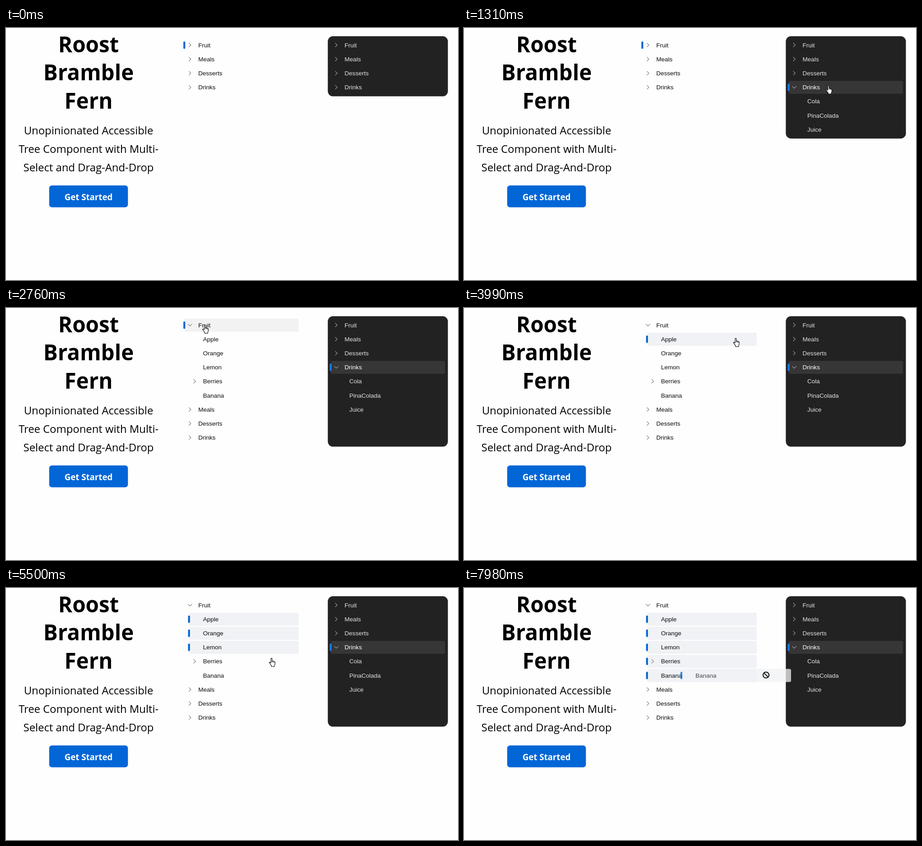
Animation of 1002x559 px, one loop 8000 ms. Source, as an HTML page:

```html
<!DOCTYPE html>
<html lang="en">
<head>
<meta charset="utf-8">
<title>Tree component</title>
<style>
  html, body { margin: 0; width: 100%; height: 100%; overflow: hidden; background: #fefefe; }
  svg { display: block; width: 1002px; height: 559px; }
  .intro { font-family: "Open Sans", "Noto Sans", sans-serif; text-anchor: middle; }
  .title { font-size: 47.5px; font-weight: 700; }
  .sub { font-size: 23.85px; }
  .cta { font-size: 18.7px; font-weight: 700; fill: #fff; }
  .tree { font: 13.52px "Liberation Sans", Arial, sans-serif; }
  .light { --text: #0c0d0f; --on: #0c0d0f; --arrow: #333; --bar: #0366d6; --row: #f0f2f5; --hover: #f2f2f3; }
  .dark { --text: #e3e3e3; --on: #fff; --arrow: #e3e3e3; --bar: #1f78e8; --row: #363636; --hover: #343434; }
  .tree text { fill: var(--text); }
  .tree text.on { fill: var(--on); }
  .bar { fill: var(--bar); }
  .row { fill: var(--row); }
  .hover { fill: var(--hover); }
  .arrow { fill: none; stroke: var(--arrow); stroke-width: 1; }
</style>
</head>
<body>
<svg id="stage" viewBox="0 0 1002 559">
  <g class="intro">
    <g class="title">
      <text x="183" y="54">Roost</text>
      <text x="183" y="116.3">Bramble</text>
      <text x="183" y="178.6">Fern</text>
    </g>
    <g class="sub">
      <text x="183" y="235.5">Unopinionated Accessible</text>
      <text x="183" y="276.7">Tree Component with Multi-</text>
      <text x="183" y="317.9">Select and Drag-And-Drop</text>
    </g>
    <rect x="95.7" y="349.3" width="174.6" height="48.4" rx="6.2" fill="#0366d6"/>
    <text class="cta" x="183" y="381.6">Get Started</text>
  </g>
  <rect id="panel" x="713.4" y="18.3" width="266.2" rx="11.5" fill="#222"/>
  <g id="light" class="tree light"></g>
  <g id="dark" class="tree dark"></g>
  <g id="ghost" class="tree light" opacity=".75"></g>
  <g id="hand" fill="#fff" stroke="#000" stroke-width="1.1" stroke-linejoin="round">
    <path d="M4.5 1.9Q4.5.6 5.8.6T7.1 1.9V7Q8.8 6.2 9.6 7.6Q11.2 7 11.9 8.5Q13.5 8.3 13.5 10.2V13Q13.5 15 12.2 16.6V19.3H5.5V17.2Q4 15.2 2.5 13Q.4 10.8.7 10Q1.8 8.6 4.5 11.2Z"/>
    <path d="M7.1 7V10M9.6 7.6V10.2M11.9 8.5V10.6" fill="none" stroke-width=".9"/>
  </g>
  <g id="barred" fill="#fff" stroke="#000" stroke-width="2">
    <circle r="6.6"/>
    <path d="M-4.6-4.6L4.6 4.6"/>
  </g>
</svg>
<script>
const LOOP = 8000, ROW = 31.2, INDENT = 10.4, DARK_X = 324.3;
const $ = id => document.getElementById(id);
const timed = [];

function add(parent, tag, attrs, from = 0, to = LOOP) {
  const el = document.createElementNS("http://www.w3.org/2000/svg", tag);
  for (const k in attrs) el.setAttribute(k, attrs[k]);
  parent.append(el);
  if (from > 0 || to < LOOP) timed.push({ el, from, to });
  return el;
}

const mid = i => 37.9 + ROW * i;

function fillRow(g, i, depth, dx, cls, from, to) {
  const indent = depth * INDENT;
  add(g, "rect", { class: cls, x: 395.6 + indent + dx, y: mid(i) - 14.3, width: 253.2 - indent, height: 28.9, rx: 3.5 }, from, to);
}

function bar(g, i, depth, dx, from, to) {
  add(g, "rect", { class: "bar", x: 393.2 + depth * INDENT + dx, y: mid(i) - 8.2, width: 4.2, height: 16.6, rx: 2 }, from, to);
}

function label(g, i, depth, dx, text, from, to, cls = "") {
  const el = add(g, "text", { x: 426.3 + depth * INDENT + dx, y: mid(i) + 4.7, class: cls }, from, to);
  el.textContent = text;
}

function arrow(g, i, depth, dx, open, from, to) {
  const x = 407.8 + depth * INDENT + dx;
  add(g, "path", { class: "arrow", d: "M-2.4-4.4L2.2 0L-2.4 4.4", transform: `translate(${x} ${mid(i)}) rotate(${open ? 90 : 0})` }, from, to);
}

function folder(g, i, depth, dx, text, from, to) {
  arrow(g, i, depth, dx, false, from, to);
  label(g, i, depth, dx, text, from, to);
}

// Light tree
const OPEN_DRINKS = 1310, OPEN_FRUIT = 2760;
const light = $("light"), dark = $("dark"), ghost = $("ghost");
const picks = [3840, 4500, 5180, 5900, 6720];
const hovers = [[1, 0, 2270, 2350], [0, 0, 2350, 3840], [1, 1, 3480, 3840],
  [2, 1, 4190, 4500], [3, 1, 4800, 5180], [4, 1, 5560, 5900], [5, 1, 6300, 6720]];
for (const [i, depth, from, to] of hovers) fillRow(light, i, depth, 0, "hover", from, to);
picks.forEach((t, i) => {
  fillRow(light, i + 1, 1, 0, "row", t);
  bar(light, i + 1, 1, 0, t);
});
bar(light, 0, 0, 0, 0, picks[0]);
arrow(light, 0, 0, 0, false, 0, OPEN_FRUIT);
arrow(light, 0, 0, 0, true, OPEN_FRUIT);
label(light, 0, 0, 0, "Fruit");
["Meals", "Desserts", "Drinks"].forEach((name, i) => {
  folder(light, i + 1, 0, 0, name, 0, OPEN_FRUIT);
  folder(light, i + 6, 0, 0, name, OPEN_FRUIT);
});
["Apple", "Orange", "Lemon", "Berries", "Banana"].forEach((name, i) =>
  label(light, i + 1, 1, 0, name, OPEN_FRUIT));
arrow(light, 4, 1, 0, false, OPEN_FRUIT);

// Dark tree
fillRow(dark, 3, 0, DARK_X, "hover", 820, OPEN_DRINKS);
fillRow(dark, 3, 0, DARK_X, "row", OPEN_DRINKS);
bar(dark, 3, 0, DARK_X, OPEN_DRINKS);
["Fruit", "Meals", "Desserts"].forEach((name, i) => folder(dark, i, 0, DARK_X, name));
arrow(dark, 3, 0, DARK_X, false, 0, OPEN_DRINKS);
arrow(dark, 3, 0, DARK_X, true, OPEN_DRINKS);
label(dark, 3, 0, DARK_X, "Drinks", 0, 820);
label(dark, 3, 0, DARK_X, "Drinks", 820, LOOP, "on");
["Cola", "PinaColada", "Juice"].forEach((name, i) =>
  label(dark, i + 4, 1, DARK_X, name, OPEN_DRINKS));

// Dragged copy of the last picked row
fillRow(ghost, 5, 1, 0, "row");
bar(ghost, 5, 1, 0);
label(ghost, 5, 1, 0, "Banana");

// Pointer moves: first step, last step, step count, end point, optional bend
const SHOW = 610, DRAG = 7660;
const moves = [
  [610, 980, 6, [803, 127]],
  [1130, 1130, 1, [802, 127]],
  [1920, 2640, 11, [435, 37], [667, 41.7]],
  [3270, 3770, 8, [597, 62]],
  [3990, 4260, 5, [594, 91]],
  [4580, 4970, 6, [585, 128]],
  [5240, 5630, 7, [580, 168], [587, 139]],
  [5970, 6630, 10, [576, 190]]
];

const ease = u => (u + u * u * (3 - 2 * u)) / 2;
const stepAt = (t, a, b, n) =>
  n < 2 ? 0 : Math.min(n - 1, Math.floor((t - a) * (n - 1) / (b - a) + 1e-6));

function pointer(t) {
  let p = [816, 204];
  for (const [a, b, n, end, bend] of moves) {
    if (t < a) break;
    const e = ease((stepAt(t, a, b, n) + 1) / n);
    p = p.map((v, k) => {
      const c = bend ? bend[k] : (v + end[k]) / 2;
      return (1 - e) ** 2 * v + 2 * e * (1 - e) * c + e * e * end[k];
    });
  }
  return p;
}

const place = (el, x, y) => el.setAttribute("transform", `translate(${x.toFixed(2)} ${y.toFixed(2)})`);
const show = (el, on) => { el.style.display = on ? "" : "none"; };

function draw(t) {
  for (const { el, from, to } of timed) show(el, t >= from && t < to);
  const rows = t < OPEN_DRINKS ? 4 : t < OPEN_FRUIT ? 7 : 9;
  $("panel").setAttribute("height", rows * ROW + 8.5);

  const dragging = t >= DRAG;
  show($("hand"), t >= SHOW && !dragging);
  show(ghost, dragging);
  show($("barred"), dragging);
  if (dragging) {
    const e = ease(stepAt(t, DRAG, 7980, 5) / 4);
    const dx = 16 + 60.2 * e, dy = 10 * (1 - e);
    place(ghost, dx, dy);
    place($("barred"), 593.3 + dx, 193 + dy);
  } else {
    place($("hand"), ...pointer(t));
  }
}

const start = performance.now();
function tick() {
  draw((performance.now() - start) % LOOP);
  requestAnimationFrame(tick);
}
tick();
</script>
</body>
</html>
```
